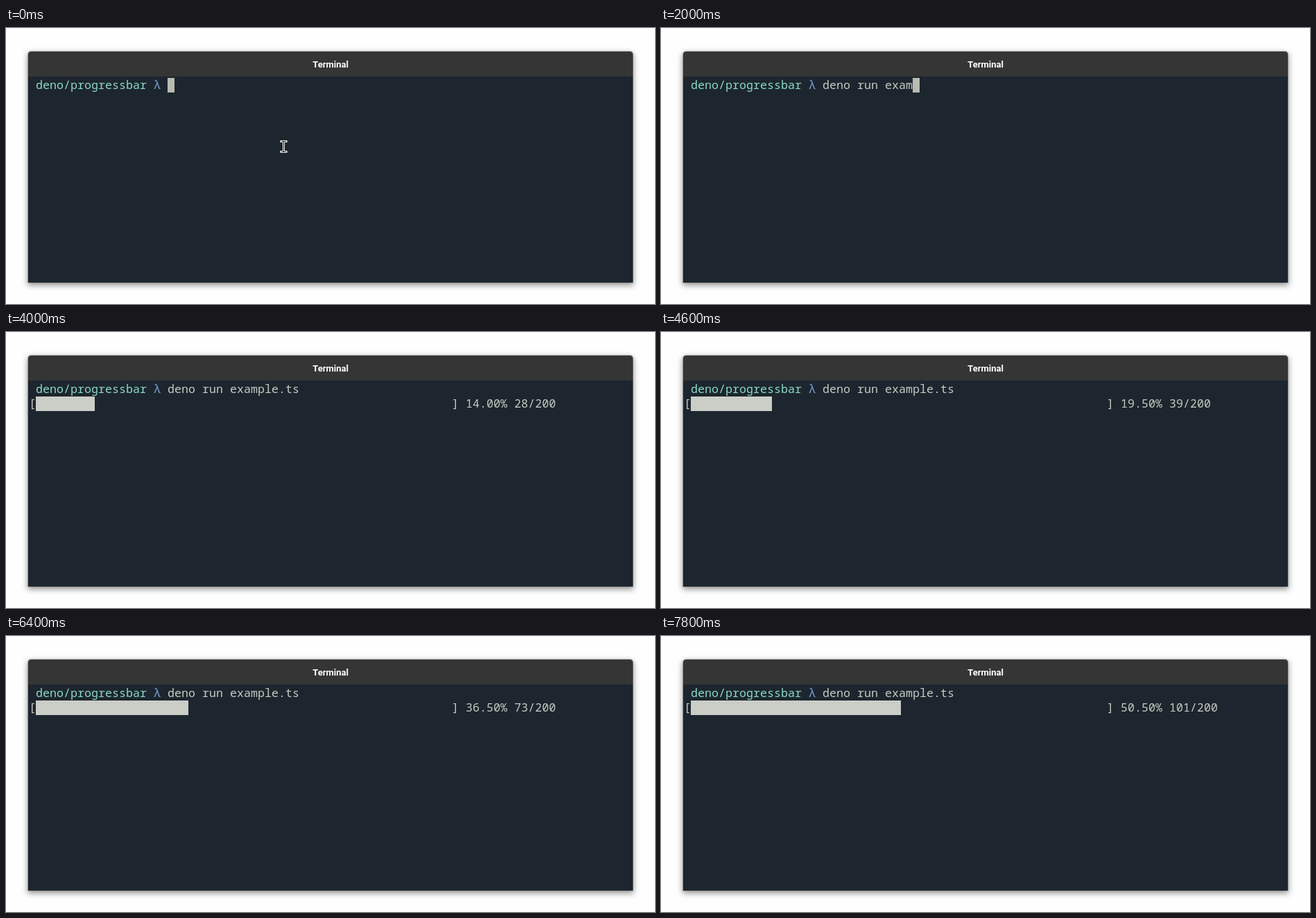
These frames come from a looping animation (936 by 398 pixels, 8000 ms). An HTML page:

```html
<!DOCTYPE html>
<html lang="en">
<head>
<meta charset="utf-8">
<title>Terminal</title>
<style>
  html, body { margin: 0; width: 100%; height: 100%; overflow: hidden; background: #fefefe; }
  .window {
    position: absolute; left: 32px; top: 34px; width: 872px; height: 333px;
    border-radius: 4px 4px 0 0;
    background: linear-gradient(#353535 36px, #1d262e 36px);
    box-shadow: 0 0 0 1px rgba(0, 0, 0, .23), 0 3px 9px 1px rgba(0, 0, 0, .42);
  }
  svg { position: absolute; left: 0; top: 0; }
  text { font: 16.667px "Noto Sans Mono", monospace; fill: #c6c9c2; }
  .title { font: bold 13px Roboto, sans-serif; fill: #fff; text-anchor: middle; }
  .path { fill: #8bd9c4; }
  .lambda { fill: #7c9fd6; }
  .pointer { fill: none; }
</style>
</head>
<body>
<div class="window"></div>
<svg width="936" height="398" viewBox="0 0 936 398">
  <text class="title" x="468" y="57">Terminal</text>
  <text class="path" x="43" y="88">deno/progressbar</text>
  <text class="lambda" x="213" y="88">λ</text>
  <text id="command" x="233" y="88"></text>
  <rect id="caret" width="10" height="21" fill="#babbb0"/>
  <g id="progress">
    <text x="33" y="109">[</text>
    <rect id="bar" x="43" y="93" height="21" fill="#cbcec7"/>
    <text x="643" y="109">]</text>
    <text id="status" x="663" y="109"></text>
  </g>
  <g id="pointer" class="pointer">
    <path d="M397 163.5h7M400.5 163.5v15M397 178.5h7" stroke="#fff" stroke-width="3" stroke-linecap="square"/>
    <path d="M397 163.5h7M400.5 163.5v15M397 178.5h7" stroke="#111" stroke-width="1"/>
  </g>
</svg>
<script>
const LOOP = 8000, STEP = 200;
const COMMAND = 'deno run example.ts';
const TOTAL = 200, CELLS = 60, CELL = 10;

// [ms, value], linear in between
const typing = [[600, 0], [2000, 13], [2200, 19]];
const counting = [[2600, 2], [3200, 13], [4600, 39], [5600, 57], [6400, 73], [7800, 101]];
const ENTER = 2400, START = 2600;

const el = id => document.getElementById(id);
const show = (id, on) => el(id).style.display = on ? '' : 'none';

function valueAt(table, t) {
  if (t <= table[0][0]) return table[0][1];
  for (let i = 1; i < table.length; i++) {
    const [t0, v0] = table[i - 1], [t1, v1] = table[i];
    if (t <= t1) return Math.round(v0 + (v1 - v0) * (t - t0) / (t1 - t0));
  }
  return table[table.length - 1][1];
}

function draw(t) {
  const typed = valueAt(typing, t);
  el('command').textContent = COMMAND.slice(0, typed);
  el('caret').setAttribute('x', t < ENTER ? 233 + typed * CELL : 33);
  el('caret').setAttribute('y', t < ENTER ? 72 : 93);
  show('caret', t < START);
  show('pointer', typed === 0);
  show('progress', t >= START);

  // The bar grows in eighths of a character cell
  const done = valueAt(counting, t);
  const eighths = Math.ceil(done / TOTAL * CELLS * 8);
  el('bar').setAttribute('width', Math.floor(eighths * CELL / 8));
  el('status').textContent = `${(done / TOTAL * 100).toFixed(2)}% ${done}/${TOTAL}`;
}

const start = performance.now();
function tick() {
  const t = (performance.now() - start) % LOOP;
  draw(Math.floor(t / STEP) * STEP);
  requestAnimationFrame(tick);
}
tick();
</script>
</body>
</html>
```
